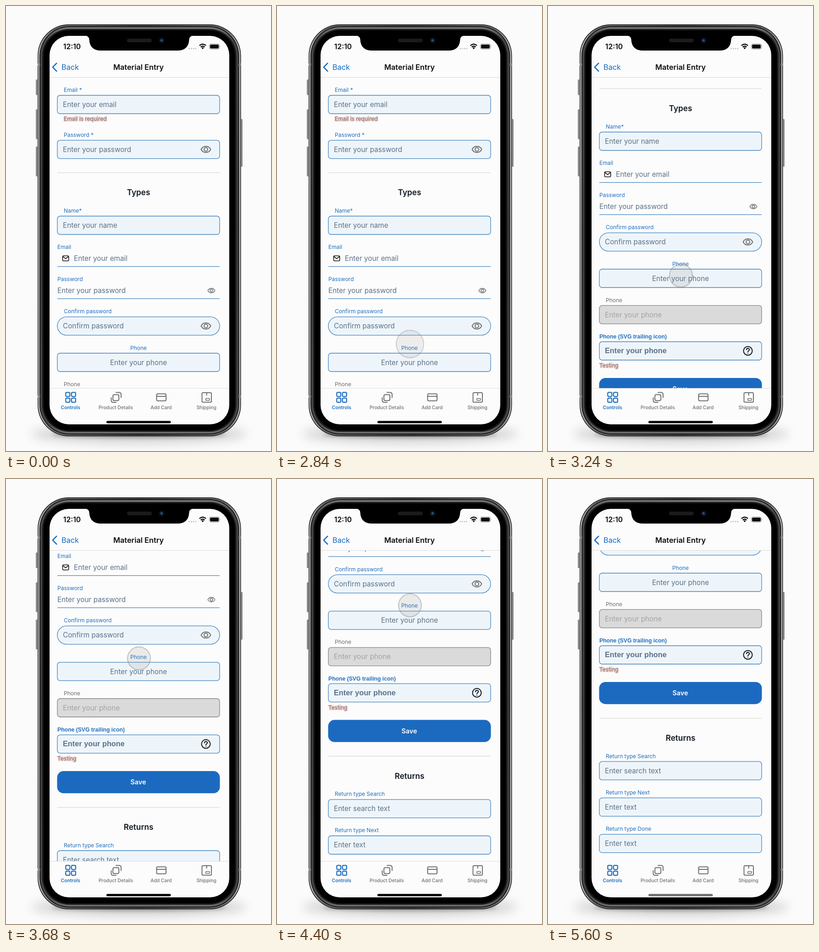
Recreate the animation shown at these times as an HTML page. Size 578x969 px, loop 8 s.

```html
<!DOCTYPE html>
<html lang="en">
<head>
<meta charset="utf-8">
<title>Material Entry</title>
<style>
html, body { margin: 0; width: 100%; height: 100%; overflow: hidden; background: #fbfbfb; }
svg { display: block; width: 100vw; height: 100vh; }
text { font-family: Inter, Roboto, sans-serif; white-space: pre; }
.line { fill: none; stroke-linecap: round; stroke-linejoin: round; }
</style>
</head>
<body>
<svg id="stage" viewBox="0 0 578 969" xmlns="http://www.w3.org/2000/svg">
  <defs>
    <linearGradient id="rim" x2="1" y2="0">
      <stop offset="0" stop-color="#bdbdbd"/><stop offset=".08" stop-color="#6a6a6a"/>
      <stop offset=".5" stop-color="#3c3c3c"/>
      <stop offset=".92" stop-color="#6a6a6a"/><stop offset="1" stop-color="#bdbdbd"/>
    </linearGradient>
    <linearGradient id="band" x2="0" y2="1">
      <stop offset="0" stop-color="#777"/><stop offset=".03" stop-color="#464646"/>
      <stop offset=".5" stop-color="#3a3a3a"/>
      <stop offset=".97" stop-color="#464646"/><stop offset="1" stop-color="#6c6c6c"/>
    </linearGradient>
    <linearGradient id="button" x2="1" y2="0">
      <stop offset="0" stop-color="#333"/><stop offset=".5" stop-color="#c4c4c4"/><stop offset="1" stop-color="#444"/>
    </linearGradient>
    <filter id="blur" x="-20%" y="-80%" width="140%" height="260%"><feGaussianBlur stdDeviation="11"/></filter>
    <filter id="soft" x="-20%" y="-150%" width="140%" height="400%"><feGaussianBlur stdDeviation="4"/></filter>
    <clipPath id="view"><rect x="95" y="156" width="392" height="676.5"/></clipPath>
  </defs>
  <rect width="578" height="969" fill="#fbfbfb"/>
  <g id="phone"></g>
  <g clip-path="url(#view)"><g id="form"></g></g>
  <g id="bars"></g>
  <line id="tabLine" x1="95" x2="487" y1="832.5" y2="832.5" stroke="#dedede"/>
  <rect id="home" x="219" y="903.5" width="140.5" height="5" rx="2.5"/>
  <circle id="touch" cx="290" fill="#8c8c8c" fill-opacity=".17" stroke="#7d7d7d" stroke-opacity=".42" stroke-width="2"/>
</svg>
<script>
const NS = 'http://www.w3.org/2000/svg';
const $ = id => document.getElementById(id);
const BLUE = '#1f6fbf', EDGE = '#4485bf', FILL = '#eef5fa', HINT = '#5c7187', GREY = '#707070';
let layer;

function add(tag, attrs, content) {
  const el = document.createElementNS(NS, tag);
  for (const k in attrs) el.setAttribute(k, attrs[k]);
  if (content) el.textContent = content;
  layer.appendChild(el);
  return el;
}
const rect = (x, y, width, height, rx, more) => add('rect', { x, y, width, height, rx, ...more });
const path = (d, stroke, width, more) =>
  add('path', { d, class: 'line', stroke, 'stroke-width': width, ...more });
const rule = (y, stroke, x1 = 112, x2 = 466, width = 1) =>
  add('line', { x1, x2, y1: y, y2: y, stroke, 'stroke-width': width });
const text = (x, y, size, fill, str, more) =>
  add('text', { x, y, 'font-size': size, fill, ...more }, str);
const MID = { 'text-anchor': 'middle' };
const ARIAL = { style: "font-family:'Liberation Sans',Arial,sans-serif", 'font-weight': 700 };

function drawPhone() {
  layer = $('phone');
  add('ellipse', { cx: 290, cy: 932, rx: 235, ry: 22, fill: '#d6d6d6', filter: 'url(#blur)' });
  add('ellipse', { cx: 290, cy: 933, rx: 190, ry: 7, fill: '#8e8e8e', filter: 'url(#soft)' });
  for (const [x, y, h] of [[65.5, 160, 34], [65.5, 225, 65], [65.5, 306, 65], [510, 246, 104]])
    rect(x, y, 5.5, h, 1.5, { fill: 'url(#button)' });
  const shell = (inset, r, fill) =>
    rect(69 + inset, 40 + inset, 443.5 - 2 * inset, 897 - 2 * inset, r, { fill });
  shell(0, 68, '#1d1d1d');
  shell(1.5, 67, 'url(#rim)');
  shell(4, 65, '#181818');
  shell(6, 63, 'url(#band)');
  shell(10, 59, '#191919');
  shell(13, 56, '#000');
  for (const y of [125, 848]) {
    rect(69, y, 5, 5, 0, { fill: '#8d8d8d' });
    rect(507.5, y, 5, 5, 0, { fill: '#8d8d8d' });
  }
  rect(95, 65, 392, 846, 42, { fill: '#fcfcfc' });
  add('path', { d: 'M173 64.5Q181 65.5 181.5 73Q183 97 207 97H374Q398 97 399.5 73Q400 65.5 408 64.5Z', fill: '#000' });
  rect(264, 71, 54, 8, 4, { fill: '#1b1b1d' });
  add('circle', { cx: 339.5, cy: 75, r: 6, fill: '#0c1420' });
  add('circle', { cx: 339.5, cy: 75, r: 2.8, fill: '#17406f' });
  add('circle', { cx: 338.7, cy: 74.3, r: 1.1, fill: '#4b8cca' });
}

function drawBars() {
  layer = $('bars');
  text(144, 94, 15.7, '#0b0b0b', '12:10', { ...MID, 'font-weight': 600 });
  for (let i = 0; i < 4; i++) add('circle', { cx: 399.7 + i * 4.7, cy: 92.8, r: 1.5, fill: '#c3c3c3' });
  path('M421.8 86.2Q429 79.6 436.2 86.2M424.7 89.4Q429 85.6 433.3 89.4', '#0b0b0b', 2.4, { style: 'stroke-linecap:butt' });
  add('path', { d: 'M426.3 91Q429 88.9 431.7 91L429 94.2Z', fill: '#0b0b0b' });
  rect(443.5, 82.5, 22, 11.5, 3.5, { fill: 'none', stroke: '#8c8c8c' });
  rect(445, 84, 19, 8.5, 2.2, { fill: '#0b0b0b' });
  add('path', { d: 'M466.8 86.2q1.6 2 0 4z', fill: '#8c8c8c' });

  path('M110.3 124.6L101.8 133.2L110.3 141.8', '#136bc4', 2.5);
  text(121, 139, 16.3, '#136bc4', 'Back');
  text(289, 139, 16.3, '#0b0b0b', 'Material Entry', { ...MID, 'font-weight': 600 });
  rule(155.5, '#dcdcdc', 95, 487);

  for (const x of [130.3, 142.9]) for (const y of [841.3, 853.9])
    rect(x, y, 9, 9, 2.2, { fill: 'none', stroke: BLUE, 'stroke-width': 2.2 });
  rect(233.2, 846.2, 13, 13, 3, { fill: 'none', stroke: GREY, 'stroke-width': 2 });
  path('M240 841.5h6.5q4.5 0 4.5 4.5v6.5M229.5 853v5.5q0 4.5 4.5 4.5h6', GREY, 2);
  rect(328.5, 844.5, 20.6, 15.2, 2.5, { fill: 'none', stroke: GREY, 'stroke-width': 2 });
  path('M328.5 850H349', GREY, 2);
  rect(427.5, 842, 20.5, 20.8, 2.2, { fill: 'none', stroke: GREY, 'stroke-width': 2 });
  rect(435.8, 854.5, 8, 4.2, 0.8, { fill: 'none', stroke: GREY, 'stroke-width': 1.6 });
  path('M437.7 842v5.5', GREY, 2);
  ['Controls', 'Product Details', 'Add Card', 'Shipping'].forEach((name, i) =>
    text(140.7 + i * 98.8, 878.4, 10.3, i ? GREY : BLUE, name, { ...MID, 'font-weight': i ? 500 : 600 }));
}

const eye = (x, y, k = 1) => {
  const more = { transform: `translate(${x} ${y}) scale(${k})` };
  path('M-10.5 0C-6 -9 6 -9 10.5 0C6 9 -6 9 -10.5 0Z', GREY, 2, more);
  add('circle', { r: 4, class: 'line', stroke: GREY, 'stroke-width': 2, ...more });
};
const label = (x, y, str, fill = BLUE, more) => text(x, y, 12, fill, str, more);

// Outlined field; y is the top of its box.
function field(y, name, hint, { r = 6, mid = false, off = false } = {}) {
  const anchor = mid ? MID : {};
  label(mid ? 289 : 126, y - 7.5, name, off ? GREY : BLUE, anchor);
  rect(112, y, 354, 40, r, { fill: off ? '#dadada' : FILL, stroke: off ? '#858585' : EDGE, 'stroke-width': 1.3 });
  text(mid ? 289 : 124, y + 25.5, 15.3, off ? '#a0a3a6' : HINT, hint, anchor);
}
function underlined(y, name, hint, x) {
  label(112, y - 38.3, name);
  text(x, y - 12.5, 15.3, HINT, hint);
  rule(y, EDGE, 112, 466, 1.3);
}
function error(x, y, str) {
  text(x, y, 12, '#f8dcd8', str, { stroke: '#f8dcd8', 'stroke-width': 4, 'stroke-linejoin': 'round' });
  text(x, y, 12, '#6e5f5f', str);
}
const heading = (y, str) => text(289, y, 17.2, '#101722', str, { ...MID, 'font-weight': 600 });

function drawForm() {
  layer = $('form');
  field(194.5, 'Email *', 'Enter your email');
  error(126, 250, 'Email is required');
  field(292.3, 'Password *', 'Enter your password');
  eye(436, 312.3);
  rule(363, '#cfcfcf');
  heading(412.3, 'Types');
  field(457.5, 'Name*', 'Enter your name');
  underlined(567.3, 'Email', 'Enter your email', 148);
  rect(123.5, 544, 13.2, 11, 2, { fill: 'none', stroke: '#151515', 'stroke-width': 1.6 });
  path('M124.5 546L130.1 550.2L135.7 546', '#151515', 1.6);
  underlined(637.3, 'Password', 'Enter your password', 112);
  eye(448, 619.7, 0.74);
  field(676.8, 'Confirm password', 'Confirm password', { r: 20 });
  eye(436, 696.8);
  field(756, 'Phone', 'Enter your phone', { mid: true });
  field(835.2, 'Phone', 'Enter your phone', { off: true });
  text(112, 907.3, 12.2, BLUE, 'Phone (SVG trailing icon)', ARIAL);
  rect(112, 914, 354, 40, 6, { fill: FILL, stroke: EDGE, 'stroke-width': 1.3 });
  text(124, 939.3, 16.3, HINT, 'Enter your phone', ARIAL);
  const at = { transform: 'translate(436 934)' };
  add('circle', { r: 9.5, class: 'line', stroke: '#12171d', 'stroke-width': 2, ...at });
  path('M-3 -2.4C-3 -6.4 3.2 -6.4 3.2 -2.6C3.2 -.4 0 -.2 0 2.2M0 5.2v.1', '#12171d', 2, at);
  error(112, 970, 'Testing');
  rect(111.5, 993, 355, 48.2, 14, { fill: '#1c6ac0' });
  text(288.5, 1022, 14.4, '#fff', 'Save', { ...MID, 'font-weight': 600 });
  rule(1072, '#cfcfcf');
  heading(1121, 'Returns');
  field(1166.2, 'Return type Search', 'Enter search text');
  field(1245.4, 'Return type Next', 'Enter text');
  field(1324.6, 'Return type Done', 'Enter text');
}

const clamp = (v, lo = 0, hi = 1) => Math.min(hi, Math.max(lo, v));
const ramp = (t, a, b) => clamp((t - a) / (b - a));

// Drag past the end, hold, then spring back to the resting scroll.
const END = 551, RELEASE = 5080;
const drag = [[2880, 0], [2990, 50], [3155, 137], [3240, 183], [3420, 267], [3600, 335], [3800, 383],
  [3995, 412], [4080, 421], [4300, 446], [4555, 510], [4640, 536], [4780, 556], [4960, 562]];
const slope = i => {
  if (i <= 0 || i >= drag.length - 1) return 0;
  return (drag[i + 1][1] - drag[i - 1][1]) / (drag[i + 1][0] - drag[i - 1][0]);
};
function dragAt(t) {
  const last = drag.length - 1;
  if (t <= drag[0][0]) return 0;
  if (t >= drag[last][0]) return drag[last][1];
  const i = drag.findIndex(p => p[0] > t) - 1;
  const [t0, y0] = drag[i], [t1, y1] = drag[i + 1];
  const d = t1 - t0, u = (t - t0) / d, v = 1 - u;
  return y0 * v * v * (1 + 2 * u) + y1 * u * u * (3 - 2 * u)
    + d * u * v * (slope(i) * v - slope(i + 1) * u);
}
function scrollAt(t) {
  if (t < RELEASE) return dragAt(t);
  return END + (dragAt(t) - END) * Math.pow(1 - ramp(t, RELEASE, 5600), 3);
}

function draw(time) {
  const t = Math.floor(time / 40) * 40;
  const y = scrollAt(t);
  $('form').setAttribute('transform', `translate(0 ${-y})`);
  $('tabLine').setAttribute('opacity', 1 - ramp(y, 540, END));
  const shade = Math.round(110 * ramp(t, 4680, 4960));
  $('home').setAttribute('fill', `rgb(${shade},${shade},${shade})`);

  // The touch mark trails the finger a little.
  const touch = $('touch'), leave = ramp(t, RELEASE, RELEASE + 160);
  const fade = t < 2840 ? 0 : (0.8 + 0.2 * ramp(t, 2840, 2960)) * (1 - leave);
  touch.setAttribute('cy', 736 - dragAt(t - 85) - 12 * ramp(t, 2840, 3000));
  touch.setAttribute('r', 25 + 5 * (1 - ramp(t, 2840, 2960)) + 5 * leave);
  touch.setAttribute('opacity', fade);
}

drawPhone();
drawForm();
drawBars();
const start = performance.now();
function tick() {
  draw((performance.now() - start) % 8000);
  requestAnimationFrame(tick);
}
tick();
</script>
</body>
</html>
```
